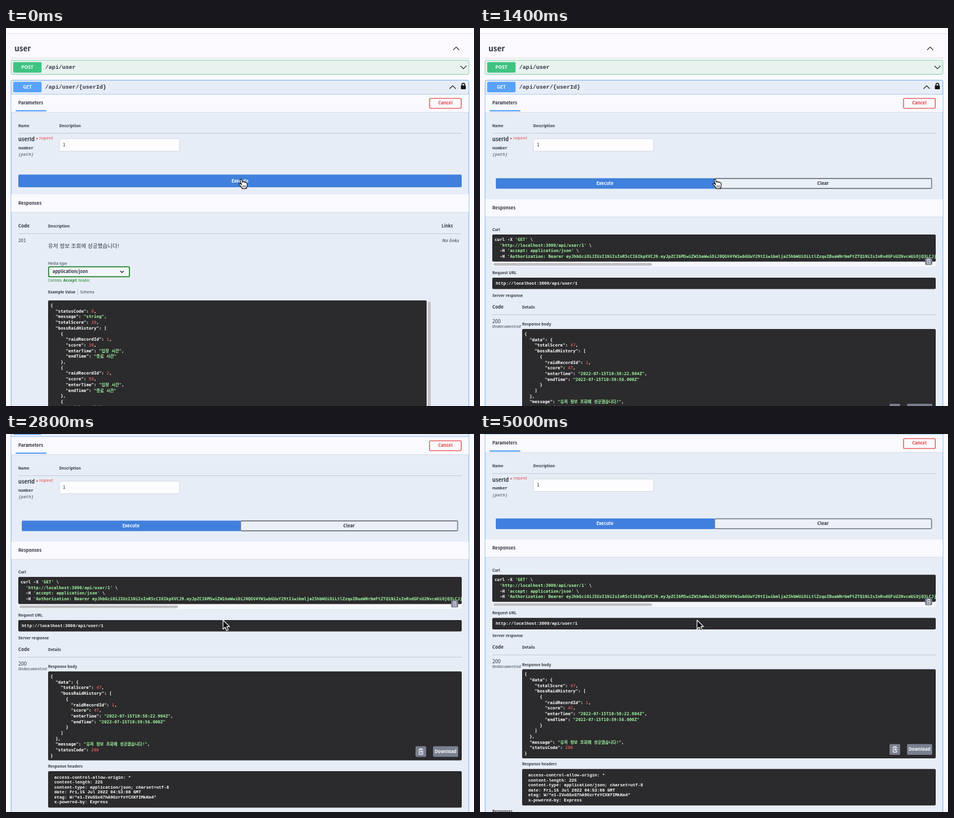
An HTML page for the animation above (5100 ms loop, 800 by 648 pixels).

```html
<!DOCTYPE html>
<html lang="ko">
<head>
<meta charset="utf-8">
<title>API docs</title>
<style>
  html, body { margin: 0; width: 100%; height: 100%; overflow: hidden; background: #fbf9fd; }
  svg { display: block; width: 800px; height: 648px; }
  text { font-family: "Noto Sans CJK KR", "Noto Sans CJK", "Noto Sans CJK JP", "Noto Sans", sans-serif; fill: #30343f; }
  .b { font-weight: 700; }
  .i { font-style: italic; }
  .m { font-family: "Liberation Mono", monospace; font-weight: 700; }
  .c { font-family: "DejaVu Sans Mono", "Noto Sans CJK KR", "Noto Sans CJK", monospace; font-weight: 700; font-size: 7.25px; }
  .w, .c { fill: #fff; }
  .grey { fill: #70757f; }
  .red { fill: #e4403f; }
  .green { fill: #1b7f22; }
  .str { fill: #a0f9a2; }
  .num { fill: #c95a5c; }
  .mid { text-anchor: middle; }
</style>
</head>
<body>
<svg id="stage" viewBox="0 0 800 648"></svg>
<script>
const LOOP = 5100, CH = 4.37;
const DARK = '#2b2a2c', BLUE = '#58a2fb', PANEL = '#e7edf7', BAND = '#faf9fe', BTN = '#4080dc', SLATE = '#7b8090';

const text = (x, y, s, size, cls = '') =>
  `<text x="${x}" y="${y}" font-size="${size}" class="${cls}">${s}</text>`;
const rect = (x, y, x2, y2, fill, r = 0, stroke = 'none', sw = 1) =>
  `<rect x="${x}" y="${y}" width="${x2 - x}" height="${y2 - y}" rx="${r}" fill="${fill}" stroke="${stroke}" stroke-width="${sw}"/>`;
const rule = (y, color = '#c3c9d4', x = 21, x2 = 779) => rect(x, y, x2, y + 1, color);
const line = (d, color = '#25272d', w = 1.3) =>
  `<path d="${d}" fill="none" stroke="${color}" stroke-width="${w}" stroke-linecap="round" stroke-linejoin="round"/>`;
const chevron = (x, y, dir, r = 4.8) => line(`M${x - r} ${y - dir * r / 2}L${x} ${y + dir * r / 2}L${x + r} ${y - dir * r / 2}`);
const band = (y, y2) => rect(9, y, 791, y2, BAND) + rule(y2, '#d7dce6', 9, 791);

// Code block: values of JSON keys and quoted shell arguments are coloured
function paint(s) {
  const span = (cls, v) => `<tspan class="${cls}">${v}</tspan>`;
  return s
    .replace(/'.*?('|$)/g, v => span('str', v))
    .replace(/(: )(".*?")/g, (_, a, v) => a + span('str', v))
    .replace(/(": )(\d+)/g, (_, a, v) => a + span('num', v))
    .replace(/[가-힣]+/g, v => `<tspan font-size="6.9">${v}</tspan>`);
}
const code = (x, y, lines, pitch = 9.7) => lines.map((s, i) => {
  const body = s.trimStart();
  return `<text x="${x + (s.length - body.length) * CH}" y="${y + i * pitch}" class="c">${paint(body)}</text>`;
}).join('');

const json = v => JSON.stringify(v, null, 2).split('\n');

function clipboard(x, y, k) {
  return `<g transform="translate(${x} ${y}) scale(${k})">` +
    line('M3 -3V-4H-3V4.5H0M-1.4 -4.8H1.4M3.8 0H-.4M1 -1.6L-.6 0L1 1.6M3 2V4.5H1', '#fff', 1.1) + '</g>';
}

function verb(y, name, path, color, dir) {
  return rect(12.3, y, 60.8, y + 18, color, 1.8) +
    text(36.5, y + 11.7, name, 7.7, 'b w mid') +
    text(67, y + 11.8, path, 9.67, 'm') +
    chevron(dir > 0 ? 782 : 763.5, y + 9, dir);
}

const shared = () =>
  rect(0, -10, 800, 9, '#fdfcfe') + rule(9, '#e4e2e9', 0, 800) +
  text(14.5, 40, 'user', 13, 'b') + chevron(769.5, 35, -1) +
  rule(51, '#d8d7de', 8, 792) +
  rect(8.8, 55.3, 791.2, 79.5, '#e8f2ef', 2, '#82cfab') +
  verb(58.5, 'POST', '/api/user', '#3fc381', 1) +
  rect(8.8, 89.5, 791.2, 900, PANEL, 2, '#72aff5') +
  rule(113, '#a5cbf6', 9, 791) +
  verb(92.3, 'GET', '/api/user/{userId}', BLUE, -1) +
  line('M779.4 99V97.2a2.4 2.4 0 0 1 4.8 0V99', '#111', 1.5) + rect(777.6, 98.6, 786, 105, '#111', 1) +
  band(114, 144) + text(21, 131, 'Parameters', 7.5, 'b') + rect(16.5, 140.8, 69, 143, BLUE) +
  rect(724, 120.6, 778.2, 137.6, 'none', 2, '#e8504f', 1.4) + text(751, 131.2, 'Cancel', 7.5, 'b red mid') +
  text(21, 169.8, 'Name', 6.5, 'b') + text(91, 169.8, 'Description', 6.5, 'b') + rule(180) +
  text(21, 194.3, 'userId', 9, 'b') + text(51, 193.5, '*', 8, 'b red') + text(57, 191, 'required', 5.8, 'red') +
  text(21, 207.6, 'number', 7.25, 'm') + text(21, 219.4, '(path)', 7.25, 'm i grey') +
  rect(91.2, 189.8, 296.8, 211.2, '#fdfcff', 2, '#d3d8e1') + text(97, 202.8, '1', 8);

function before() {
  const raid = (raidRecordId, score) =>
    ({ raidRecordId, score, enterTime: '입장 시간', endTime: '종료 시간' });
  const sample = {
    statusCode: 0, message: 'string', totalScore: 30,
    bossRaidHistory: [raid(1, 30), raid(2, 50), raid(3, 20)]
  };
  return rect(21, 251.2, 779, 273, BTN, 2) + text(400, 264.6, 'Execute', 7.6, 'b w mid') +
    band(285, 315.5) + text(21, 302.5, 'Responses', 7.6, 'b') +
    text(21, 342.3, 'Code', 7.7, 'b') + text(72, 342, 'Description', 6.5, 'b') + text(744.5, 342.3, 'Links', 7.4, 'b') +
    rule(352) +
    text(21, 366.7, '201', 7.8) + text(745, 366.7, 'No links', 7.7, 'i') +
    text(72, 377, '유저 정보 조회에 성공했습니다!', 9.27) +
    text(72, 405.6, 'Media type', 6.25) +
    rect(72.8, 409.3, 211, 426.4, '#f3f6fb', 2, '#21832a', 1.7) +
    text(79.5, 420.2, 'application/json', 7.55, 'b') + chevron(198.3, 418, 1, 2.6) +
    text(72, 435.4, 'Controls', 5.9, 'green') + text(98, 435.4, 'Accept', 6.6, 'm green') + text(123.8, 435.4, 'header.', 5.9, 'green') +
    text(72, 454.6, 'Example Value', 6.5, 'b') + rect(122.4, 447, 123.1, 457.5, '#b4b9c3') + text(126.8, 454.6, 'Schema', 6.4) +
    rect(72, 467, 719, 800, DARK, 2) + rect(721, 469, 726, 800, '#c2c1c5', 2.5) +
    code(76, 478, json(sample));
}

function after() {
  const token = 'eyJhbGciOiJIUzI1NiIsInR5cCI6IkpXVCJ9.eyJpZCI6MSwiZW1haWwiOiJ0QGV4YW1wbGUuY29tIiwi' +
    'bmlja25hbWUiOiLtlZzquIBuaWNrbmFtZTQ1NiIsInRvdGFsU2NvcmUiOjQ3LCJjcmVhdGVk';
  const curl = [
    "curl -X 'GET' \\",
    "  'http://localhost:3000/api/user/1' \\",
    "  -H 'accept: application/json' \\",
    `  -H 'Authorization: Bearer ${token}`
  ];
  const reply = {
    data: {
      totalScore: 47,
      bossRaidHistory: [{
        raidRecordId: 1, score: 47,
        enterTime: '2022-07-15T10:58:22.904Z', endTime: '2022-07-15T10:59:56.000Z'
      }]
    },
    message: '유저 정보 조회에 성공했습니다!', statusCode: 200
  };
  const headers = [
    'access-control-allow-origin: *',
    'content-length: 225',
    'content-type: application/json; charset=utf-8',
    'date: Fri,15 Jul 2022 04:53:08 GMT',
    'etag: W/"e1-IVuGSxG7hA9OzrfeYCXKfIMkKm4"',
    'x-powered-by: Express'
  ];
  return rect(401, 258, 772, 275, '#ebeff8', 1.5, '#5c616c', 1.3) + rect(27, 257.4, 401, 275.6, BTN, 1.5) +
    text(213.5, 268.8, 'Execute', 7.6, 'b w mid') + text(586.3, 268.8, 'Clear', 7.6, 'b mid') +
    band(293.5, 323.5) + text(21, 311, 'Responses', 7.6, 'b') +
    text(21, 348.4, 'Curl', 6.5, 'b') +
    rect(21, 398, 779, 409, '#f6f7fa', 2) + rect(21, 354, 779, 400.5, DARK, 2) +
    rect(23, 403, 294, 407.4, '#bfbfc1', 2.2) +
    `<g clip-path="url(#curl)">${code(25, 365, curl)}</g>` +
    rect(760.8, 394.2, 773, 406.2, SLATE, 2) + clipboard(767, 400.2, .8) +
    text(21, 421.9, 'Request URL', 6.6, 'b') + rect(21, 428, 779, 447.6, DARK, 2) +
    text(27, 440.2, 'http://localhost:3000/api/user/1', 7.27, 'm w') +
    text(21, 460.6, 'Server response', 6.55, 'b') +
    text(21, 481.2, 'Code', 7.7, 'b') + text(72, 480.6, 'Details', 6.5, 'b') + rule(491) +
    text(21, 505.5, '200', 8.6) + text(21, 514.2, 'Undocumented', 6.8, 'm i grey') +
    text(72, 510.4, 'Response body', 6.6, 'b') +
    rect(72, 516, 779, 668.6, DARK, 2) + code(76, 527, json(reply)) +
    rect(700, 644.2, 718.2, 662.6, SLATE, 2) + clipboard(709.3, 653.6, 1) +
    rect(730, 644.2, 773, 662.6, SLATE, 2) + text(751.4, 655.9, 'Download', 7.45, 'b w mid') +
    text(72, 681, 'Response headers', 6.6, 'b') +
    rect(72, 687, 779, 749.4, DARK, 2) +
    headers.map((s, i) => text(82.5, 699.8 + i * 8.5, s, 7.27, 'm w')).join('') +
    text(21, 762.2, 'Responses', 6.6, 'b');
}

const arrow = '<path d="M0 0V15.6L3.6 12.3L6.1 18L8.9 16.8L6.4 11.2H11.2Z" fill="#111" stroke="#fff" stroke-width="1.2" stroke-linejoin="round"/>';
const hand = '<path d="M402.6 268.8L400.4 261.6C399.7 259.2 402.2 258.4 403 260.6L404.4 264.4C405 263 407 263.2 407.3 264.6C408.2 263.6 409.8 264 410 265.2C411.4 264.6 412.3 265.6 412.3 267V270.6C412.3 272.6 411 273.4 410.8 275.4H403.8C403.4 272.6 400 270.6 398.4 268.2C397.4 266.4 399.6 265.6 400.8 266.9Z" fill="#fff" stroke="#111" stroke-width="1.2" stroke-linejoin="round"/>' +
  line('M405 270V273M407.2 270V273M409.4 270V273', '#111', .8);

document.getElementById('stage').innerHTML =
  '<clipPath id="curl"><rect x="21" y="354" width="758" height="47"/></clipPath>' +
  rect(0, 0, 800, 648, '#fbf9fd') +
  `<g id="page">${shared()}<g id="before">${before()}</g><g id="after">${after()}</g></g>` +
  `<g id="hand">${hand}</g><g id="arrow">${arrow}</g>`;

// Each step is [time in ms, value], held until the next one
function play(id, prop, steps) {
  const frames = steps.map(([t, v]) => ({ offset: t / LOOP, [prop]: v, easing: 'steps(1, end)' }));
  frames.push({ offset: 1, [prop]: steps[steps.length - 1][1] });
  document.getElementById(id).animate(frames, { duration: LOOP, iterations: Infinity });
}
const move = (t, x, y) => [t, `translate(${x}px, ${y}px)`];
const scroll = (t, y) => move(t, 0, -y);
const show = t => [[0, 'hidden'], [t, 'visible']];
const hide = t => [[0, 'visible'], [t, 'hidden']];

const SENT = 1400, LEAVE = 1700;
play('before', 'visibility', hide(SENT));
play('after', 'visibility', show(SENT));
play('hand', 'visibility', hide(LEAVE));
play('arrow', 'visibility', show(LEAVE));
play('arrow', 'transform', [
  move(0, 400, 266), move(1800, 391, 282), move(1900, 380, 303), move(2000, 373, 316), move(2100, 371, 319)
]);
play('page', 'transform', [
  scroll(0, 0), scroll(2400, 7), scroll(2500, 21), scroll(2600, 41.8), scroll(2700, 84),
  scroll(2800, 109), scroll(2900, 112), scroll(3000, 112.7)
]);
</script>
</body>
</html>
```
